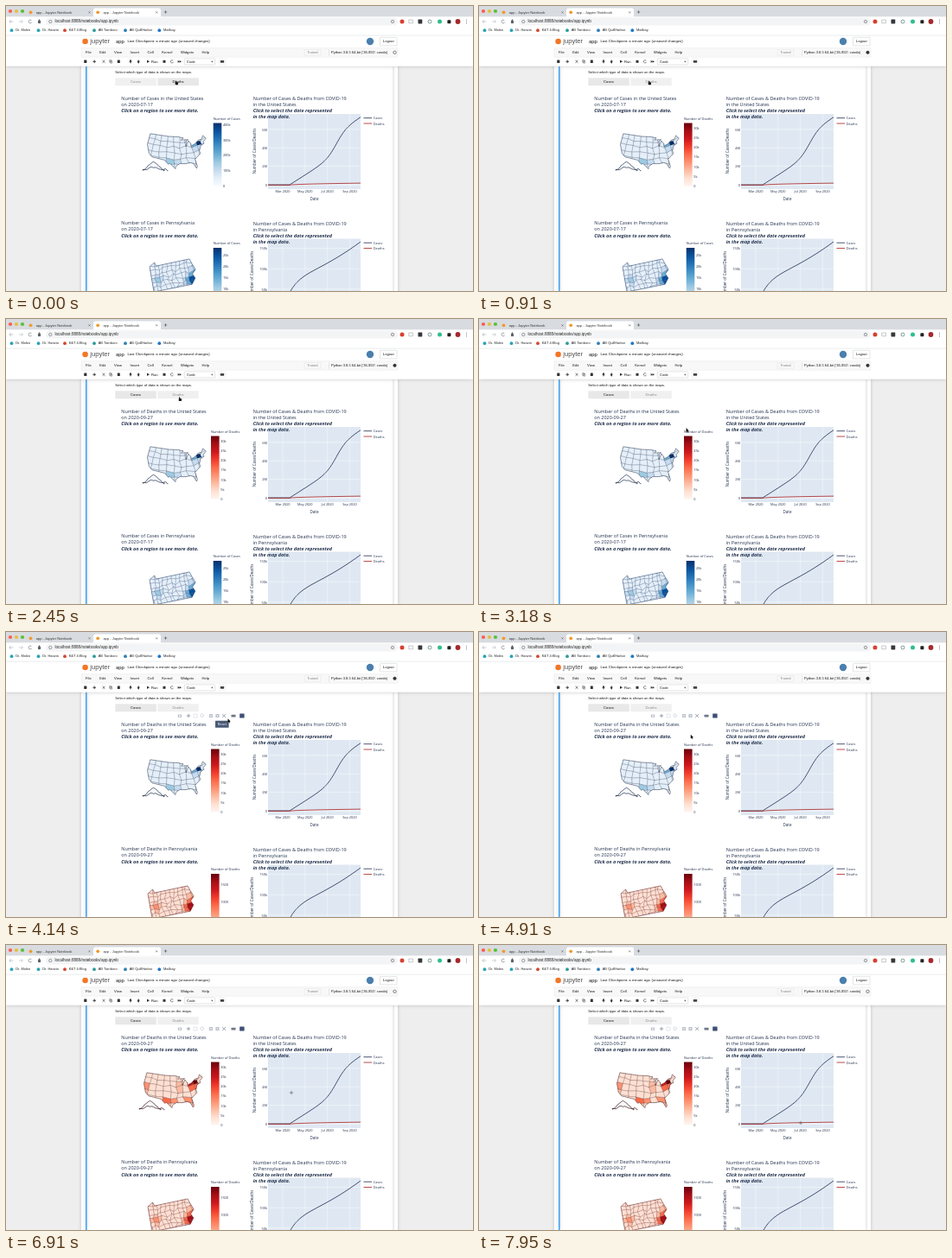
An HTML page with a canvas that plays this animation: 540 px wide and 330 px high, repeating every 8 s.

```html
<!DOCTYPE html>
<html lang="en">
<head>
<meta charset="utf-8">
<title>Notebook dashboard</title>
<style>
html, body { margin: 0; width: 100%; height: 100%; overflow: hidden; background: #fff; }
canvas { display: block; width: 540px; height: 330px; }
</style>
</head>
<body>
<canvas id="stage"></canvas>
<script>
const W = 540, H = 330, LOOP = 8000;
const canvas = document.getElementById('stage');
const ratio = Math.max(1, window.devicePixelRatio || 1);
canvas.width = W * ratio;
canvas.height = H * ratio;
const c = canvas.getContext('2d');

const UI = '"Liberation Sans", Arial, sans-serif';
const PLOT = '"Open Sans", sans-serif';
const INK = '#22314d', ICON = '#333', NAVY = '#1d2b52', CRIMSON = '#a8201f';
const BLUES = ['#08306b', '#08519c', '#2171b5', '#4292c6', '#6baed6', '#9ecae1', '#c6dbef', '#e4eff9', '#f7fbff'];
const REDS = ['#67000d', '#a50f15', '#cb181d', '#ef3b2c', '#fb6a4a', '#fc9272', '#fcbba1', '#fee0d2', '#fff5f0'];

// Times of the hard changes
const PRESS = 865, TITLE = 2450, MODEBAR = 3320, STATE = 3660, RECOLOR = 4930;

// Drawing helpers
function text(s, x, y, size, o = {}) {
  c.font = `${o.style || ''} ${size}px ${o.font || UI}`;
  c.fillStyle = o.color || '#111';
  c.textAlign = o.align || 'left';
  c.textBaseline = 'middle';
  c.fillText(s, x, y);
  return c.measureText(s).width;
}
const plotText = (s, x, y, size, o = {}) => text(s, x, y + 0.7, size, { font: PLOT, color: INK, ...o });

function rect(x, y, w, h, color, r = 0) {
  c.fillStyle = color;
  c.beginPath();
  c.roundRect(x, y, w, h, r);
  c.fill();
}
function frame(x, y, w, h, color, r = 0) {
  c.strokeStyle = color;
  c.lineWidth = 0.4;
  c.beginPath();
  c.roundRect(x, y, w, h, r);
  c.stroke();
}
function dot(x, y, r, color) {
  c.fillStyle = color;
  c.beginPath();
  c.arc(x, y, r, 0, 7);
  c.fill();
}
function ring(x, y, r, color, from = 0, to = 7) {
  c.strokeStyle = color;
  c.lineWidth = 0.6;
  c.beginPath();
  c.arc(x, y, r, from, to);
  c.stroke();
}
function trace(pts, close) {
  c.beginPath();
  pts.forEach(([x, y], i) => i ? c.lineTo(x, y) : c.moveTo(x, y));
  if (close) c.closePath();
}
function stroke(pts, color, lw = 0.5, close = false) {
  trace(pts, close);
  c.strokeStyle = color;
  c.lineWidth = lw;
  c.stroke();
}
function fill(pts, color) {
  trace(pts, true);
  c.fillStyle = color;
  c.fill();
}
const hline = (x, y, w, color, lw) => stroke([[x, y], [x + w, y]], color, lw);
const vline = (x, y, h, color, lw) => stroke([[x, y], [x, y + h]], color, lw);
function cross(x, y, r, color, lw, diagonal) {
  c.save();
  c.translate(x, y);
  if (diagonal) c.rotate(Math.PI / 4);
  hline(-r, 0, 2 * r, color, lw);
  vline(0, -r, 2 * r, color, lw);
  c.restore();
}
// Triangle pointing right, turned by quarter turns
function tri(x, y, r, color, turn = 0) {
  fill([0, 1, 2].map(k => {
    const a = k * Math.PI * 2 / 3 + turn * Math.PI / 2;
    return [x + r * Math.cos(a), y + r * Math.sin(a)];
  }), color);
}
function arrow(x, y, dir, color) {
  hline(x - 2.2, y, 4.4, color, 0.6);
  stroke([[x + dir * 0.4, y - 1.9], [x + dir * 2.2, y], [x + dir * 0.4, y + 1.9]], color, 0.6);
}

const range = n => Array.from({ length: n }, (_, i) => i);
const pairs = s => s.split(',').map(p => p.split(' ').map(Number));
const noise = (a, b) => {
  const v = Math.sin(a * 127.1 + b * 311.7) * 43758.5453;
  return v - Math.floor(v) - 0.5;
};

// Fills an outline with a lattice of regions
function regions(outline, cols, rows, knot, tone, ink) {
  c.save();
  trace(outline, true);
  c.clip();
  for (let j = 0; j < rows; j++) for (let i = 0; i < cols; i++) {
    const cell = [knot(i, j), knot(i + 1, j), knot(i + 1, j + 1), knot(i, j + 1)];
    fill(cell, tone(i, j));
    stroke(cell, ink, 0.22, true);
  }
  c.restore();
  stroke(outline, ink, 0.5, true);
}
const shade = (scale, heat) => scale[Math.max(0, Math.round(7 - 7 * heat))];

// Albers conic projection; longitudes are given in degrees west
const rad = Math.PI / 180;
const sinA = Math.sin(29.5 * rad), cone = (sinA + Math.sin(45.5 * rad)) / 2;
const radius = lat => Math.sqrt(1 + sinA * (2 * cone - sinA) - 2 * cone * Math.sin(lat * rad)) / cone;
function albers([lon, lat]) {
  const a = cone * (96 - lon) * rad, r = radius(lat);
  return [198 + 94 * r * Math.sin(a), 170 - 92 * (radius(37.5) - r * Math.cos(a))];
}

const country = pairs('124.7 48.4,116 49,105 49,95 49,89.6 48,92 46.7,84.8 46.5,87 45.7,87.6 41.7,86.4 43.5,84.7 45.7,82.5 43,83 41.6,79 42.8,76.3 44.1,74.8 45,71.5 45,69.2 47.4,67 44.8,70.8 42.8,70 41.8,74 40.6,76 37.2,75.6 35.3,81 32,80.1 26.5,81 25.2,82.8 29,85 29.9,89.2 29.5,94 29.7,97.2 27.7,97.4 25.9,102 29.8,103.2 29,106.5 31.8,114.8 32.5,117.1 32.5,120.6 34.5,124.3 40.4').map(albers);
// Columns narrow towards the east, where borders are also less straight
function stateKnot(i, j) {
  const s = i / 10, wobble = 1 + 2.5 * s;
  return [126 - 73 * s + 14 * s * s + noise(i, j) * wobble, 49.6 - 4.2 * j + noise(j + 9, i) * wobble];
}
const hotSpots = [[120, 37, 0.5], [99.5, 31, 0.62], [82, 28, 0.5], [75.5, 43, 1.25], [88, 41, 0.25]];
function stateHeat(i, j) {
  const [lon, lat] = stateKnot(i + 0.5, j + 0.5);
  return hotSpots.reduce((sum, [x, y, w]) => sum + w * Math.exp(-((lon - x) ** 2 + (lat - y) ** 2) / 12), 0);
}

function usMap(red) {
  const ink = red ? '#3a1416' : '#1f2d48';
  c.save();
  if (red) c.translate(-4, 0);
  regions(country, 10, 6, (i, j) => albers(stateKnot(i, j)),
    (i, j) => red ? shade(REDS, stateHeat(i, j)) : shade(BLUES, stateHeat(i, j) ** 2), ink);
  const hump = (s, h) => [158 + 25 * s, 190 - h * Math.sin(Math.PI * s) ** 2 + noise(Math.round(s * 12), h) * 2];
  const coast = range(13).map(k => hump(k / 12, 9)).concat(range(13).map(k => hump(1 - k / 12, 3)));
  fill(coast, '#f4f7fb');
  stroke(coast, ink, 0.7, true);
  range(3).forEach(k => dot(184 + k * 1.4, 188.4 + k * 1.1, 0.6, ink));
  c.restore();
}

const place = ([u, v]) => [166 + 48 * u + 5 * v, 302 - 9.5 * u + 29 * v];
const border = pairs('0 0,.13 -.13,.16 .02,.96 0,1 .2,1.06 .45,.97 .6,1.02 .78,.92 1,0 1').map(place);
function stateMap(red) {
  const scale = red ? REDS : BLUES;
  const knot = (i, j) => place([(i - 1 + noise(i, j) * 0.75) / 10, (j - 1 + noise(j + 20, i) * 0.7) / 6]);
  const tone = (i, j) => {
    const d = Math.hypot(i - 10.5, j - 5.5), west = Math.hypot(i - 2, j - 4);
    return shade(scale, 1.1 * Math.exp(-d * d / 2.5) + 0.25 * Math.exp(-west * west));
  };
  c.save();
  if (red) c.translate(-2, 1);
  regions(border, 13, 8, knot, tone, red ? '#5a1216' : '#173560');
  c.restore();
}

// Plots
const spread = (labels, start, step) => labels.map((s, i) => [s, start + i * step]);

function colorbar(red, y, ticks) {
  const x = red ? 237 : 239.7, scale = red ? REDS : BLUES;
  plotText(`Number of ${red ? 'Deaths' : 'Cases'}`, x, y - 5.5, 3.86);
  const g = c.createLinearGradient(0, y, 0, y + 73);
  scale.forEach((k, i) => g.addColorStop(i / 8, k));
  rect(x, y, 9.6, 73, g);
  ticks.forEach(([s, ty]) => plotText(s, x + 11.2, ty, 3.86));
}
function titles(lines, x, y) {
  lines.forEach((s, i) => plotText(s, x, y + i * 7.1, 5.46, { style: i > 1 ? 'italic bold' : '' }));
}
function mapTitles(region, late, y) {
  titles([`Number of ${late ? 'Deaths' : 'Cases'} in ${region}`, `on 2020-${late ? '09-27' : '07-17'}`,
    'Click on a region to see more data.'], 133.3, y);
}

const sigmoid = x => 1 / (1 + Math.exp(-x));
const share = (x, from) => Math.max(0, (x - from) / (410 - from));
function usCases(x) {
  const s = share(x, 328);
  return 207 - 52 * s - 26.5 * sigmoid((s - 0.66) / 0.07);
}
function paCases(x) {
  const s = share(x, 321);
  return 350 - 36 * (1 - Math.exp(-s / 0.12)) - 41 * s ** 1.6;
}
const usDeaths = x => 207.4 - 2.3 * Math.sqrt(share(x, 328));
const paDeaths = x => 350 - 3 * share(x, 328);

function lineChart(top, region, yTicks, cases, deaths, nameX, nameY) {
  const series = [['Cases', NAVY, cases], ['Deaths', CRIMSON, deaths]];
  rect(303, top, 107, 87, '#dfe8f2');
  c.save();
  c.beginPath();
  c.rect(303, top, 107, 87);
  c.clip();
  range(4).forEach(k => vline(320 + k * 25.8, top, 87, '#fff', 0.4));
  yTicks.forEach(([s, y]) => hline(303, y, 107, '#fff', s === '0' ? 0.8 : 0.4));
  series.forEach(([, color, f]) => stroke(range(108).map(k => [303 + k, f(303 + k)]), color, 0.8));
  c.restore();
  yTicks.forEach(([s, y]) => plotText(s, 302, y, 3.86, { align: 'right' }));
  series.forEach(([s, color], i) => {
    const y = top + 4.7 + i * 6.3;
    hline(413.5, y, 9.5, color, 0.8);
    plotText(s, 424.8, y, 3.86);
  });
  c.save();
  c.translate(nameX, nameY);
  c.rotate(-Math.PI / 2);
  plotText('Number of Cases/Deaths', 0, 0, 4.5, { align: 'center' });
  c.restore();
  titles(['Number of Cases & Deaths from COVID-19', 'in ' + region,
    'Click to select the date represented', 'in the map data.'], 285.7, top - 18);
}

// Window and page
function browser() {
  const grey = '#5f6368';
  rect(0, 0, W, 12.5, '#d8dbdf');
  ['#fc5b57', '#e5bf3c', '#57c038'].forEach((k, i) => dot(5 + i * 7, 6, 2.1, k));
  rect(101, 2.5, 78, 10, '#fff', [2.5, 2.5, 0, 0]);
  [28.5, 106.2].forEach(x => {
    dot(x, 7.3, 1.9, '#f09a2d');
    text('app - Jupyter Notebook', x + 6.2, 7.4, 4, { color: '#333' });
    cross(x + 68, 7.4, 1.3, '#444', 0.5, true);
  });
  cross(184.5, 7, 1.7, '#444', 0.6);
  rect(0, 12.5, W, 22, '#fff');
  rect(46, 13.6, 407, 9, '#f3f4f5', 4.5);
  arrow(6.2, 18, -1, '#a5a8ab');
  arrow(17.2, 18, 1, '#b4b7ba');
  ring(28, 18, 1.9, grey, 0.4, 5.6);
  tri(38.5, 17.2, 2.2, grey, -1);
  rect(37, 17.5, 3, 2.6, grey);
  ring(51.3, 18, 1.7, grey);
  text('localhost:8888/notebooks/app.ipynb', 56.5, 18, 4.6, { color: '#222' });
  ring(447, 18, 1.7, grey);
  dot(458, 18, 2.5, '#d8402f');
  frame(465.8, 16, 4.6, 3.8, '#777');
  rect(476.5, 15.6, 4.8, 4.8, '#35383b', 0.6);
  ring(490, 18, 2, '#35605a');
  dot(501.5, 18, 2.5, '#2fbf8a');
  rect(510.4, 16.2, 4, 4, '#222', 0.7);
  dot(522.5, 18, 2.9, '#a5292c');
  range(3).forEach(k => dot(532.5, 16 + 2 * k, 0.5, grey));

  const marks = [[6.5, '#2aa3b5', 'Dr. Molen'], [37.5, '#2aa3b5', 'Dr. Harwin'], [68, '#d3472f', 'K&T 4:Blog'],
    [102, '#2b9d9c', 'AB Tamboro'], [138, '#2c7fb8', 'AB QuillHarbor'], [177.3, '#1f78c8', 'Mailbay']];
  marks.forEach(([x, color, s]) => {
    dot(x, 28.2, 1.9, color);
    text(s, x + 4.7, 28.3, 4, { color: '#222' });
  });
  hline(0, 34, W, '#dadce0');
}

function page() {
  rect(0, 34, W, 296, '#eeeeee');
  c.save();
  c.shadowColor = 'rgba(87,87,87,.3)';
  c.shadowBlur = 4 * ratio;
  rect(87, 60, 366, 290, '#fff');
  vline(448, 70, 260, '#ababab', 0.35);
  rect(92, 70, 1.6, 260, '#42a5f5');
  rect(0, 34.3, W, 35.4, '#fff');
  c.restore();
}

function header(busy) {
  dot(91.6, 41, 3.3, '#f37726');
  text('jupyter', 97.3, 41, 7.6, { color: '#4e4e4e' });
  text('app', 127, 41, 5.9);
  text('Last Checkpoint: a minute ago', 140.5, 41.2, 4.25);
  text('(unsaved changes)', 199.5, 41.2, 4.25);
  dot(421, 41, 4.2, '#4b7fae');
  frame(432.5, 36.3, 19.5, 9.6, '#bbb', 0.7);
  text('Logout', 442.2, 41.2, 4.18, { align: 'center' });

  rect(87, 48.7, 366, 10.5, '#f8f8f8');
  frame(87, 48.7, 366, 10.5, '#e2e2e2');
  let x = 92;
  for (const s of ['File', 'Edit', 'View', 'Insert', 'Cell', 'Kernel', 'Widgets', 'Help']) x += text(s, x, 53.8, 4.18) + 9.6;
  frame(345, 50.5, 19, 6.8, '#ddd');
  text('Trusted', 354.5, 54, 3.6, { color: '#777', align: 'center' });
  vline(373.5, 50, 8, '#ccc', 0.4);
  text("Python 3.8.5 64-bit ('36-950': conda)", 376, 53.8, 4.05);
  ring(449.5, 53.8, 1.7, ICON);
  if (busy) dot(449.5, 53.8, 1.8, ICON);
}

function toolbar() {
  const y = 64.3;
  rect(90.2, y - 1.7, 3.2, 3.4, ICON, 0.4);
  cross(102.2, y, 1.8, ICON, 0.9);
  cross(113, y, 2.1, ICON, 0.6, true);
  frame(119.6, y - 1.8, 2, 2.6, ICON);
  frame(120.7, y - 0.8, 2, 2.6, ICON);
  rect(128.8, y - 1.7, 3, 3.5, ICON, 0.3);
  [[144, -1], [153.2, 1]].forEach(([x, turn]) => {
    tri(x, y + turn * 0.4, 1.9, ICON, turn);
    vline(x, y - 1.9, 3.8, ICON, 1.1);
  });
  tri(164, y, 2, ICON);
  text('Run', 168, y + 0.1, 4.18);
  rect(181.5, y - 1.5, 3, 3, ICON);
  ring(192, y, 1.6, ICON, 0.4, 5.6);
  [199.4, 201.4].forEach(x => tri(x, y, 1.6, ICON));
  frame(206.3, 60.9, 35.5, 7, '#bbb', 0.6);
  text('Code', 209, y + 0.2, 4.18);
  tri(238.3, y, 1.1, ICON, 1);
  frame(246, 60.9, 8, 7, '#e0e0e0', 0.6);
  rect(247.8, y - 1.3, 4.4, 2.7, '#444', 0.4);
}

function toggles(t) {
  text('Select which type of data is shown on the maps.', 126.3, 77.2, 4.18);
  ['Cases', 'Deaths'].forEach((s, i) => {
    const live = (t < PRESS) === (i === 1), x = 126.3 + i * 49;
    rect(x, 83.3, 47.5, 8.9, live ? '#e8e8e8' : '#f0f0f0');
    text(s, x + 23.7, 87.9, 4.18, { align: 'center', color: live ? '#111' : '#8e8e8e' });
  });
}

function modebar() {
  const y = 97, pale = '#bcc1c9', mid = '#8f97a5';
  rect(198.8, y - 1.6, 4.4, 3.4, pale, 0.6);
  dot(201, y + 0.1, 0.9, '#fff');
  cross(211, y, 2.2, mid, 0.9);
  frame(217, y - 2, 4, 4, pale);
  ring(226.7, y - 0.3, 1.8, pale);
  [237, 244.5].forEach((x, i) => {
    rect(x - 2.1, y - 2.1, 4.2, 4.2, pale, 0.4);
    cross(x, y, 1.2 - i * 0.3, '#fff', 0.6);
  });
  cross(252.2, y, 2.9, mid, 0.8, true);
  rect(260.5, y - 1.2, 5, 2.6, '#6f7886', 0.5);
  rect(270.2, y - 2.6, 5.4, 5.2, '#3f4f75', 0.4);
}

// Pointer stops: arrival time, x, y; each trip takes the same time
const TRIP = 800;
const stops = [[3100, 240, 128], [3950, 257, 102], [5400, 222, 157], [6750, 330, 171], [7850, 372, 206]];
function pointerAt(t) {
  let x = 197, y = 88;
  for (const [at, px, py] of stops) {
    const k = Math.min(1, Math.max(0, 1 + (t - at) / TRIP)), e = k * k * (3 - 2 * k);
    x += (px - x) * e;
    y += (py - y) * e;
  }
  return [x, y];
}
function pointer(t) {
  const [x, y] = pointerAt(t);
  if (x > 303 && y > 125) return cross(x, y, 2.2, '#555', 0.6);
  if (y < 93 && x < 223) {
    rect(x - 0.9, y - 1.5, 1.1, 3, '#111', 0.5);
    rect(x - 1.3, y + 0.3, 3.3, 3, '#111', 0.8);
    return;
  }
  const tip = [[x - 0.5, y - 1.8], [x - 0.5, y + 2.8], [x + 2.7, y + 1.5]];
  fill(tip, '#111');
  stroke([[x + 0.7, y + 1.5], [x + 1.6, y + 3.4]], '#111', 0.9);
}

function tips(t) {
  if (t >= 3850 && t < 4600) {
    rect(242, 102.8, 15.6, 8, '#4a5a75', 0.6);
    text('Reset', 249.8, 106.9, 3.86, { color: '#fff', align: 'center' });
  }
  if (t >= 5300 && t < 5950) {
    rect(221.3, 153.6, 10.2, 6.4, '#1c1416');
    plotText('458', 226.4, 156.5, 3.86, { color: '#fff', align: 'center' });
    rect(231.5, 153.6, 6, 6.4, '#e2e0e2');
    plotText('33', 232.3, 156.5, 3.86);
  }
}

function draw(t) {
  c.setTransform(ratio, 0, 0, ratio, 0, 0);
  page();
  browser();
  header(t >= PRESS && t < RECOLOR);
  toolbar();
  toggles(t);

  const redBar = t >= PRESS, redState = t >= STATE;
  mapTitles('the United States', t >= TITLE, 106.8);
  mapTitles('Pennsylvania', redState, 251.2);
  usMap(t >= RECOLOR);
  stateMap(redState);
  colorbar(redBar, 135.5, redBar ? spread(['30k', '25k', '20k', '15k', '10k', '5k', '0'], 141, 11.2)
    : spread(['400k', '300k', '200k', '100k', '0'], 137, 17.8));
  colorbar(redState, 280, redState ? spread(['1500', '1000'], 292.5, 20) : spread(['25k', '20k', '15k', '10k'], 288, 13));

  lineChart(125, 'the United States', spread(['6M', '4M', '2M', '0'], 142.8, 21.4), usCases, usDeaths, 287.5, 168);
  spread(['Mar 2020', 'May 2020', 'Jul 2020', 'Sep 2020'], 320, 25.8)
    .forEach(([s, x]) => plotText(s, x, 214, 3.86, { align: 'center' }));
  plotText('Date', 356.5, 223, 4.5, { align: 'center' });
  lineChart(269.5, 'Pennsylvania', spread(['150k', '100k', '50k'], 280.6, 23.6), paCases, paDeaths, 284.5, 310);

  if (t >= MODEBAR) modebar();
  tips(t);
  pointer(t);
}

const start = performance.now();
function tick() {
  draw((performance.now() - start) % LOOP);
  requestAnimationFrame(tick);
}
tick();
</script>
</body>
</html>
```
